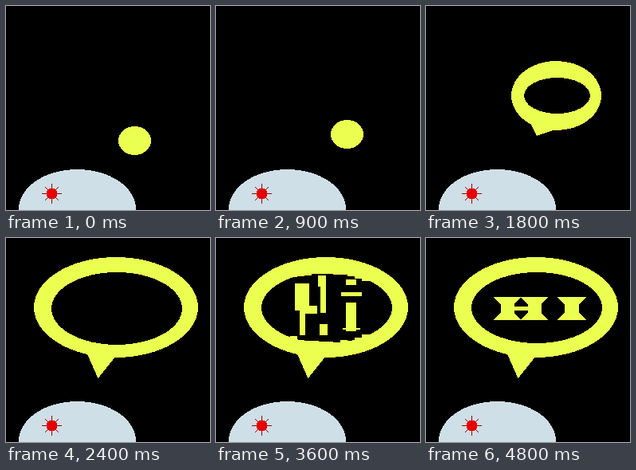
Recreate the animation shown at these times as an HTML page. Size 256 by 256 pixels, loop 8100 ms.

```html
<!DOCTYPE html>
<html lang="en">
<head>
<meta charset="utf-8">
<title>Hi</title>
<style>
  html, body { margin: 0; width: 100%; height: 100%; overflow: hidden; background: #000; }
  svg { display: block; width: 100vw; height: 100vh; shape-rendering: crispEdges; }
  .glow { fill: #eaff50; }
</style>
</head>
<body>
<svg viewBox="0 0 256 256" role="img" aria-label="HI">
  <ellipse cx="89.5" cy="255" rx="73.5" ry="50" fill="#cfdfe7"/>
  <path id="rays" stroke="#900000"/>
  <circle cx="57.5" cy="235.5" r="7" fill="#e80000"/>
  <ellipse id="body" class="glow"/>
  <path id="tail" class="glow"/>
  <ellipse id="hole"/>
  <path id="word" class="glow"/>
</svg>
<script>
const LOOP = 8100, STEP = 300;
const $ = id => document.getElementById(id);
const lerp = (a, b, p) => a + (b - a) * p;
const oval = (cx, cy, rx, ry) => ({ cx, cy, rx, ry });
const box = (x0, y0, x1, y1) => `M${x0} ${y0}H${x1}V${y1}H${x0}Z`;
const bar = (cx, width, y0, y1) => box(cx - width / 2, y0, cx + width / 2, y1);

// Height of an oval's edge above or below its centre at x.
const edge = (o, x) => o.ry * Math.sqrt(1 - ((x - o.cx) / o.rx) ** 2);

// The tail's base sits on the balloon's lower edge.
function tailPath(o, x, y) {
  const l = x - o.rx * 0.13, r = x + 21;
  return `M${l} ${o.cy + edge(o, l)}L${x} ${y}L${r} ${o.cy + edge(o, r)}Z`;
}
const balloon = (body, hole, x, y) => ({ body, hole, tail: tailPath(body, x, y) });

// The small ball trembles while it drifts right and up.
const ball = i => ({ body: oval(161.5 + i, 169 - 7 * (i % 2) - (i >> 1), 20.5, 18) });

const swell = { body: oval(161.5, 156.5, 27.5, 24.5) };
const bud = balloon(oval(149, 121, 40, 35), oval(149, 121, 20, 11), 131, 166);
const ring = balloon(oval(163.5, 112.5, 56.5, 43.5), oval(164.5, 112.5, 41.5, 22.5), 139, 163);
const full = balloon(oval(138, 87, 103, 63), oval(139, 88.5, 82, 45.5), 115.5, 176);
const inner = oval(139, 87.5, 82, 44.5);
const say = word => ({ ...full, hole: inner, word });

// Broken strokes of both letters, settling from a taller, narrower spread.
function rough(p) {
  const x = v => lerp(97, 99, p) + (v - 99) * lerp(80, 84, p) / 84;
  const y = v => lerp(44, 47, p) + (v - 47) * lerp(84, 75, p) / 75;
  const stroke = (cx, w, y0, y1) => box(x(cx - w / 2), y(y0), x(cx + w / 2), y(y1));
  const left = stroke(108, 18, 57, 91) + stroke(108, 7, 91, 122);
  const cross = stroke(119, 16, 85, 95);
  const right = stroke(133, 10, 47, 61) + stroke(134.5, 7, 61, 94) + stroke(135, 10, 108, 122);
  const i = stroke(169.5, 13, 52, 59) + stroke(170, 26, 68, 73) +
    stroke(169.5, 13, 81, 117) + stroke(170, 22, 113, 115);
  return left + cross + right + i;
}

// Ragged bits along the hole's upper and lower edge.
function rim() {
  let seed = 7, d = '';
  const rand = () => (seed = seed * 16807 % 2147483647) / 2147483647;
  for (let x = 93; x < 184; x += 9) {
    const e = edge(inner, x + 4.5);
    const top = inner.cy - e, low = inner.cy + e;
    d += box(x, top - 3, x + 9, top + 3 * rand()) + box(x, low - 3 * rand(), x + 9, low + 3);
  }
  return d;
}

const slabStem = (cx, width, stem, y0, y1) =>
  bar(cx, width, y0, y0 + 5) + bar(cx, stem, y0, y1) + bar(cx, width, y1 - 5, y1);
const slab = (x0, x1, y0, y1) =>
  slabStem(x0 + 12, 23, 13, y0 + 1, y1) + slabStem(x0 + 42, 23, 12, y0, y1) +
  box(x0 + 17, lerp(y0, y1, 0.4), x0 + 37, lerp(y0, y1, 0.6)) +
  slabStem(x1 - 18, 35, 12, y0 + 4, y1 - 6);

// Stem with wide pointed serifs.
function spike(cx, width, stem, y0, y1) {
  const x0 = cx - width / 2, x1 = cx + width / 2, l = cx - stem / 2, r = cx + stem / 2;
  return `M${x0} ${y0}H${x1}L${r} ${y0 + 9}V${y1 - 9}L${x1} ${y1}H${x0}L${l} ${y1 - 9}V${y0 + 9}Z`;
}
const latin = y => {
  const low = y + 29;
  return spike(102, 36, 17, y, low) + spike(136, 36, 17, y, low) +
    bar(119, 24, y + 12, y + 17) + spike(183, 38, 18, y, low);
};

const poses = [
  ...[0, 1, 2, 3].map(ball),
  swell, bud, ring, ring, full,
  ...[0, 1, 2, 3].map(k => say(rough(k / 3) + (k > 2 ? rim() : ''))),
  say(slab(96, 189, 59, 119) + rim()),
  say(slab(94, 189, 65, 115) + rim()),
  say(latin(73)),
  say(latin(74))
];

$('rays').setAttribute('d', Array.from({ length: 8 }, (_, i) => {
  const a = i * Math.PI / 4;
  return `M57.5 235.5l${12.5 * Math.cos(a)} ${12.5 * Math.sin(a)}`;
}).join(''));

function setOval(el, o) {
  for (const key in o) el.setAttribute(key, o[key]);
}

let shown = -1;
function draw() {
  const i = Math.min(poses.length - 1, Math.floor(performance.now() % LOOP / STEP));
  if (i !== shown) {
    const { body, hole = oval(0, 0, 0, 0), tail = '', word = '' } = poses[shown = i];
    setOval($('body'), body);
    setOval($('hole'), hole);
    $('tail').setAttribute('d', tail);
    $('word').setAttribute('d', word);
  }
  requestAnimationFrame(draw);
}
draw();
</script>
</body>
</html>
```
